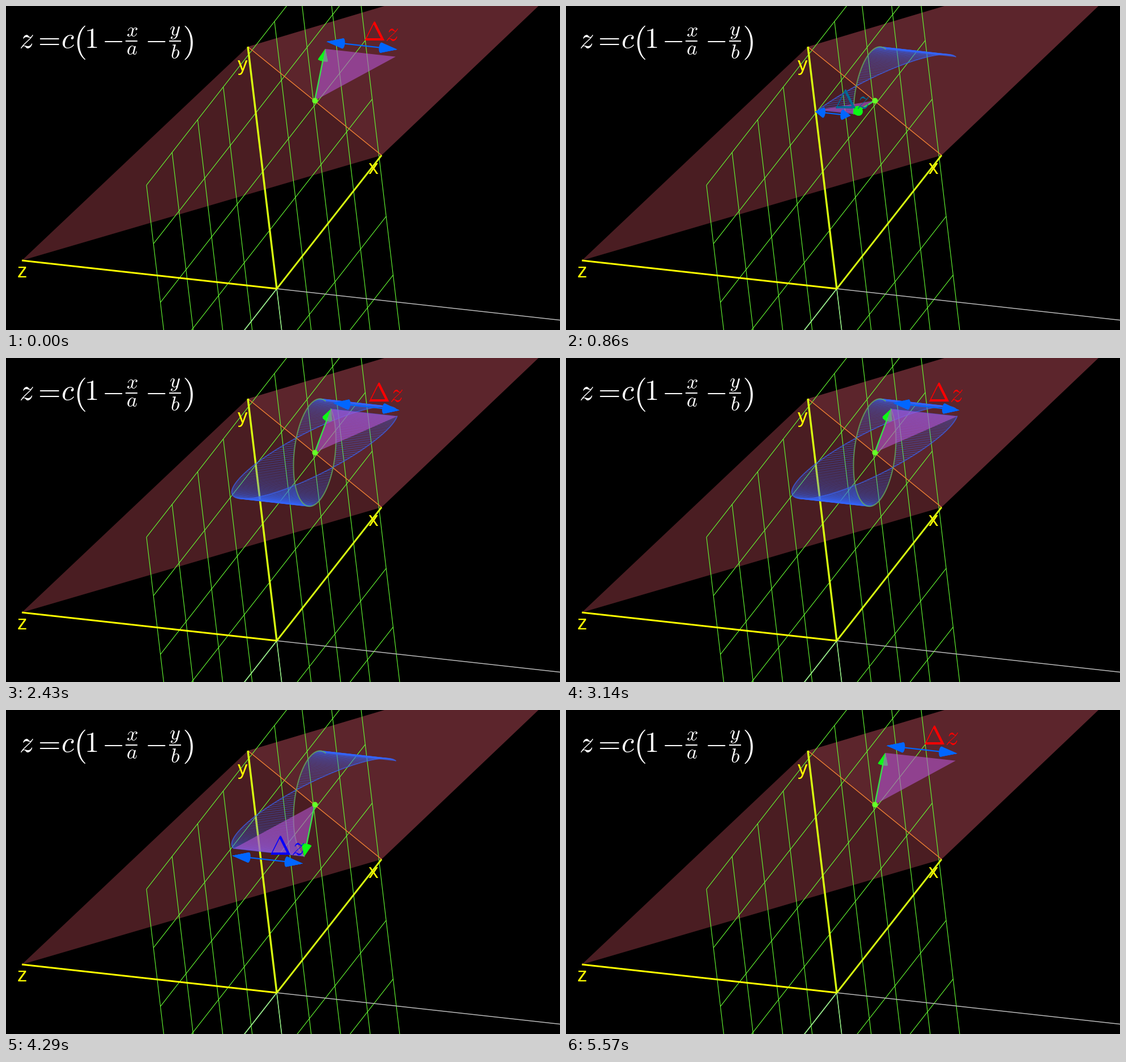
A matplotlib script for the animation above (5710 ms loop, 978 by 573 pixels).

```python
import numpy as np
import matplotlib.pyplot as plt
from matplotlib.animation import FuncAnimation
from matplotlib.collections import LineCollection, PolyCollection

W, H, DPI = 978, 573, 72
FRAMES, LOOP = 40, 5710

plt.rcParams["mathtext.fontset"] = "cm"
fig = plt.figure(figsize=((W + 1e-3) / DPI, (H + 1e-3) / DPI), dpi=DPI,
                 facecolor="black")
ax = fig.add_axes([0, 0, 1, 1])
ax.set_xlim(0, W)
ax.set_ylim(H, 0)
ax.axis("off")

# Orthographic projection: screen vectors of one unit along each axis
O = np.array([478, 500.0])
EX = np.array([45.2, -57.9])
EY = np.array([-12.3, -103.7])
EZ = np.array([-109.8, -12.2])
VIEW = np.array([-94, 58])          # in-plane part of the viewing direction
TIP = 4.1
X_TIP, Y_TIP, Z_TIP = np.array([663, 264]), np.array([427, 72]), np.array([28, 450])
C = np.array([545, 167.3])
RADIUS, START, STEP = 0.8, 45, 20


def radial(deg):
    t = np.radians(deg)
    return RADIUS * (np.multiply.outer(np.cos(t), EX) + np.multiply.outer(np.sin(t), EY))


def height(deg):
    """Height of the slanted plane above the circle point."""
    t = np.radians(deg)
    return -RADIUS * (np.cos(t) + np.sin(t))


def line(p, q, color, lw, z):
    return ax.plot([p[0], q[0]], [p[1], q[1]], color=color, lw=lw, zorder=z,
                   solid_capstyle="butt")[0]


def text(x, y, s, size, color="white", ha="left", **kw):
    return ax.text(x, y, s, fontsize=size, color=color, ha=ha, va="baseline", **kw)


def cone(tip, base, u, v):
    """Silhouette of a cone as its base ellipse plus slices through the tip."""
    t = np.linspace(0, 2 * np.pi, 24, endpoint=False)
    rim = base + np.outer(np.cos(t), u) + np.outer(np.sin(t), v)
    return [rim] + [np.array([tip, rim[i], rim[i + 12]]) for i in range(12)]


def label_color(z):
    s = np.clip(z / 1.2, -1, 1)
    return (max(s, 0), 1 - abs(s), max(-s, 0))


# Slanted plane, split where it crosses z = 0
ax.fill(*zip(Z_TIP, Y_TIP, X_TIP), color="#4a1d22", lw=0, zorder=0)
ax.fill(*zip(Y_TIP, (668, 0), (940, 0), X_TIP), color="#5c252c", lw=0, zorder=0)

# Grid and axes
for i in range(-4, 5):
    for a, b in ((EX, EY), (EY, EX)):
        line(O + i * a - 4 * b, O + i * a + 4 * b, "#66ff33", 1.1, 2)
line(Y_TIP, X_TIP, "#ee7f33", 1.4, 2.5)
line(O, O - 5 * EZ, "#bdbdbd", 1.5, 2.5)
line(O, O - 2 * EX, "#97e58c", 1.8, 2.6)
line(O, O - EY, "#97e58c", 1.5, 2.6)
line(O, Z_TIP, "#ffff00", 3, 3)
line(O, Y_TIP, "#d8ff10", 3.4, 3)
line(O, X_TIP, "#d8ff10", 3, 3)
for x, y, s in ((418, 115, "y"), (648, 297, "x"), (28, 480, "z")):
    text(x, y, s, 35, "#ffff00", "center", family="Liberation Sans", zorder=3.5)

# Formula
for x, y, s, size in ((36, 74, "$z$", 51), (72, 74, "$=$", 51), (109, 74, "$c$", 51),
                      (130, 80, "$($", 61), (150, 74, "$1$", 51),
                      (187.5, 74, "$-$", 51), (263.5, 74, "$-$", 51),
                      (222, 54, "$x$", 36), (222, 86, "$a$", 36),
                      (298, 52, "$y$", 36), (298, 93, "$b$", 36),
                      (321, 80, "$)$", 61)):
    text(x, y, s, size, ha="center", zorder=3.5)
for x in (211, 288):
    line((x, 62), (x + 21, 62), "white", 2, 3.5)

# Moving parts
rulings = ax.add_collection(LineCollection([], colors="#3366ff", lw=1.3, alpha=0.55, zorder=4))
top_trail, = ax.plot([], [], color="#3a62f0", lw=1.8, alpha=0.7, zorder=4)
ring_trail, = ax.plot([], [], color="#66b35c", lw=2, alpha=0.75, zorder=4.1)
head = ax.add_collection(PolyCollection([], color="#0cf915", lw=0))
wedge = ax.fill([0, 0, 0], [0, 0, 0], color="#b355d3", alpha=0.6, lw=0, zorder=6)[0]
spoke = line(C, C, "#37e04a", 2.4, 6.5)
span = line(C, C, "#0066ff", 2.2, 7)
span_heads = ax.add_collection(PolyCollection([], color="#0066ff", lw=0, zorder=7))
ax.plot(*C, "o", ms=10, mfc="#66ff26", mew=0, zorder=8)
label = text(0, 0, r"$\Delta z$", 47, zorder=6.8)


def update(k):
    deg = START + STEP * min(k, FRAMES - 1 - k)
    r, dz = radial(deg), height(deg) * EZ
    p = C + r

    # Swept surface, at most one full turn
    a = np.arange(START, min(deg, START + 360) + 1, 2) if deg > START else np.array([])
    low = C + radial(a)
    high = low + np.multiply.outer(height(a), EZ)
    rulings.set_segments(list(np.stack([low, high], axis=1)))
    ring_trail.set_data(low[:, 0], low[:, 1])
    top_trail.set_data(high[:, 0], high[:, 1])

    # Radius arrow and wedge
    t = np.radians(deg)
    tangent = -np.sin(t) * EX + np.cos(t) * EY
    head.set_verts(cone(p, C + 0.78 * r, 0.075 * tangent, 0.075 * EZ))
    away = VIEW @ (np.cos(t), np.sin(t)) > 0
    head.set_zorder(6.6 if away else 5)
    wedge.set_xy([C, p, p + dz])
    end = C + 0.8 * r
    spoke.set_data([C[0], end[0]], [C[1], end[1]])

    # Double arrow for the height, just outside the circle
    q0 = C + 1.14 * r
    q1 = q0 + dz
    n0, n1 = q0 + 0.23 * dz, q1 - 0.23 * dz
    span.set_data([n0[0], n1[0]], [n0[1], n1[1]])
    span_heads.set_verts(cone(q0, n0, 0.077 * EX, 0.077 * EY)
                         + cone(q1, n1, 0.077 * EX, 0.077 * EY))

    mid = (q0 + q1) / 2
    label.set_position((mid[0] + 2, mid[1] - 9))
    label.set_color(label_color(-height(deg) / RADIUS))
    return rulings, ring_trail, top_trail, head, wedge, spoke, span, span_heads, label


anim = FuncAnimation(fig, update, frames=FRAMES, interval=LOOP / FRAMES,
                     repeat=True, repeat_delay=0, blit=False)
plt.show()
```
